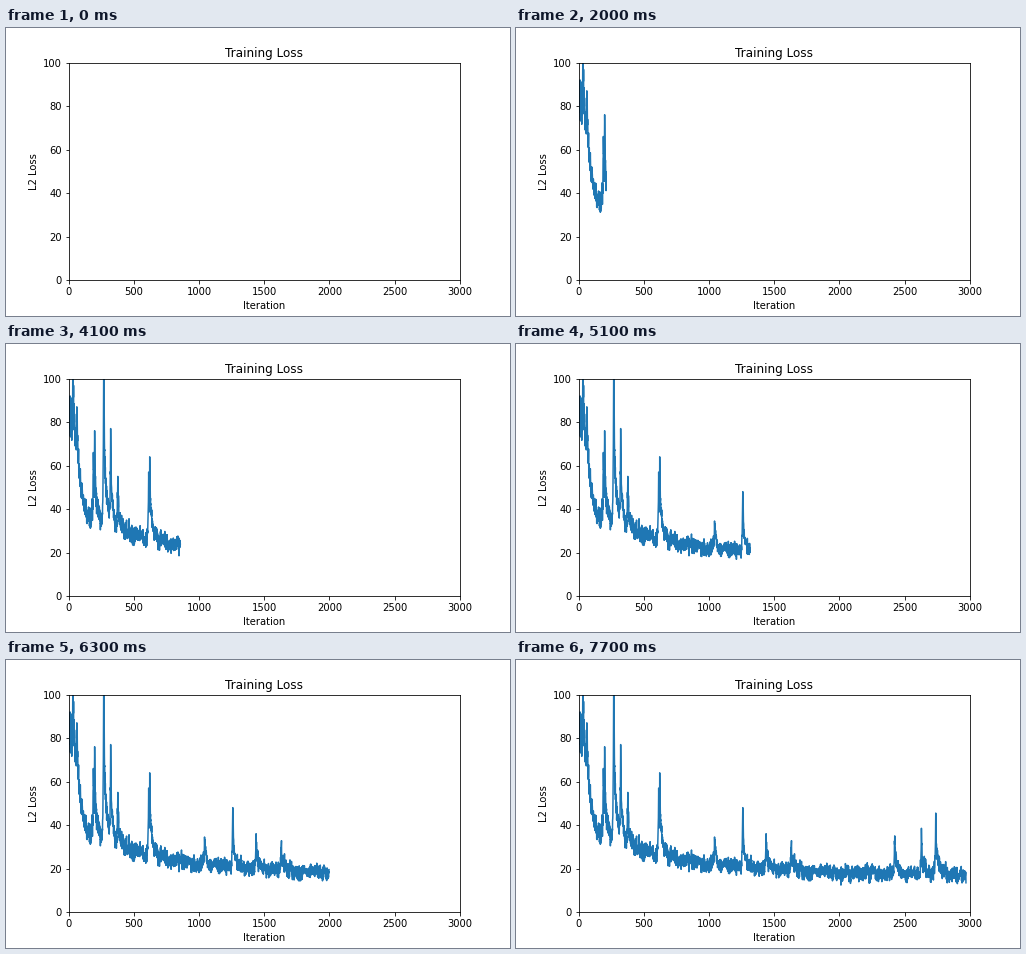
Write a matplotlib script that moves like this. It is 504 px wide and 288 px high and loops after 7.8 s.

```python
import numpy as np
import matplotlib.pyplot as plt
from matplotlib.animation import FuncAnimation

FRAMES, INTERVAL = 78, 100
STEPS = 3000

# The main spikes: iteration -> loss
PEAKS = {8: 92, 30: 112, 60: 87, 187: 66, 197: 76, 267: 112, 320: 77,
         375: 55, 612: 57, 620: 64, 1042: 33, 1258: 48, 1437: 36,
         1630: 32, 2425: 35, 2630: 38.5, 2740: 45.5}


def trend(x):
    """Fast early drop followed by a slow decay to a floor."""
    return 17 + 22 * np.exp(-x / 700) + 36 * np.exp(-(x / 85) ** 2)


def spike(x, at, peak):
    """Steep rise, sharp tip and a longer tail."""
    d = x - at
    rise = np.exp(np.minimum(d, 0) / 4)
    fall = np.maximum(d, 0)
    shape = 0.55 * np.exp(-fall / 4) + 0.45 * np.exp(-fall / 22)
    return (peak - trend(at)) * rise * shape


def make_loss():
    rng = np.random.RandomState(4)
    x = np.arange(STEPS)
    mean = trend(x) + np.max([spike(x, *p) for p in PEAKS.items()], axis=0)
    drift = np.convolve(rng.normal(0, 3, STEPS), np.ones(15) / 15, "same")
    noise = np.clip(rng.normal(0, 1, STEPS), -2.3, 2.6)
    loss = mean + drift + noise * (1.1 + 0.03 * mean)
    loss[list(PEAKS)] = list(PEAKS.values())
    return x, loss


xs, loss = make_loss()

fig, ax = plt.subplots(figsize=(7, 4), dpi=72)
fig.subplots_adjust(left=0.125, right=0.9, bottom=0.125, top=0.88)
ax.set(xlim=(0, STEPS), ylim=(0, 100), title="Training Loss",
       xlabel="Iteration", ylabel="L2 Loss")
line, = ax.plot([], [], color="#1f77b4", lw=1.5)


def draw(k):
    # Each frame adds a slightly longer stretch than the one before
    n = max(0, round(0.492 * (k - 1) * (k + 2.5)))
    line.set_data(xs[:n], loss[:n])
    return line,


anim = FuncAnimation(fig, draw, frames=FRAMES, interval=INTERVAL,
                     init_func=lambda: draw(0), repeat=True, repeat_delay=0)
plt.show()
```
